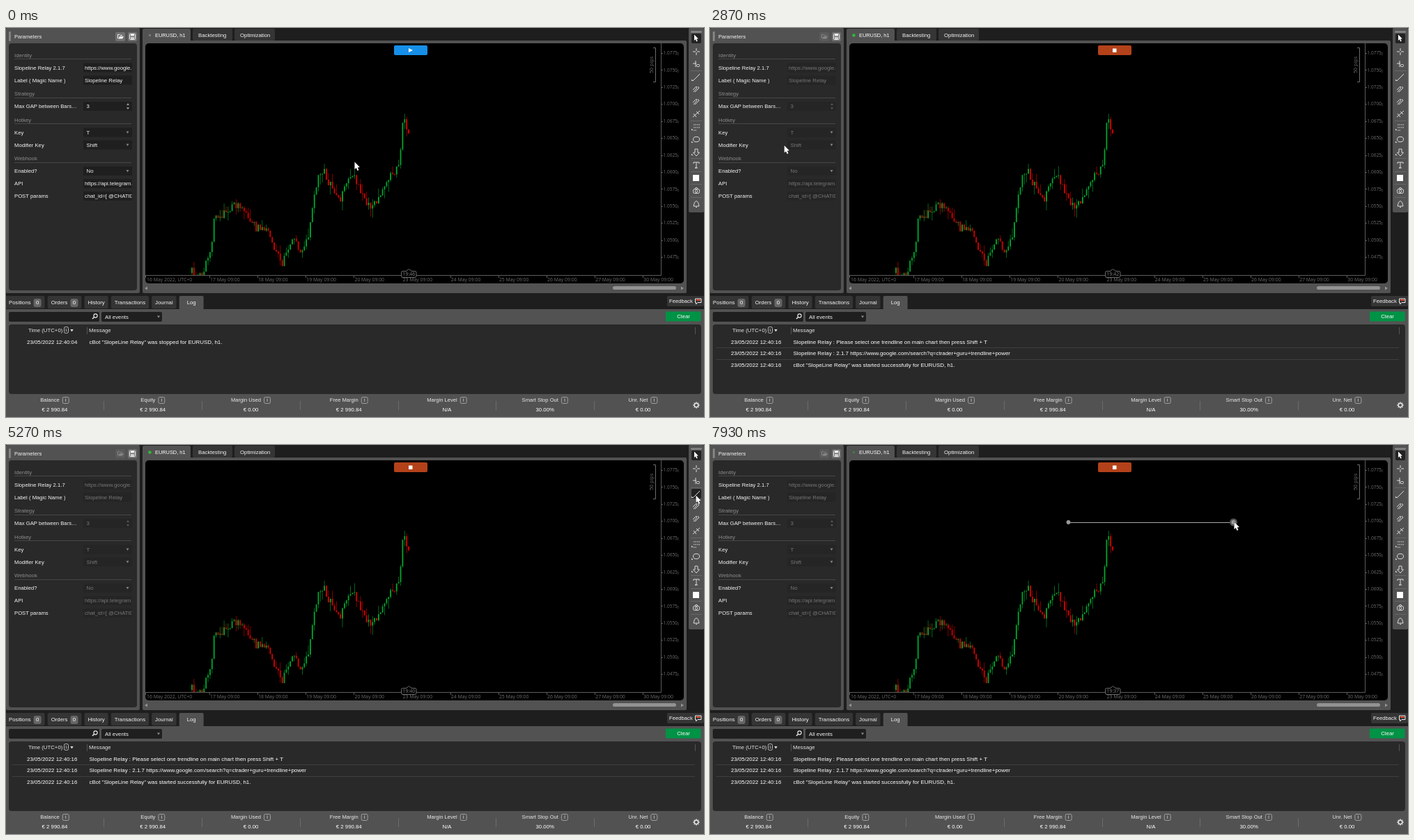
Write an HTML page with a canvas that moves like this. It is 1002 by 559 pixels and loops after 8 s.

```html
<!DOCTYPE html>
<html lang="en">
<head>
<meta charset="utf-8">
<title>Trading terminal</title>
<style>
html, body { margin: 0; width: 100%; height: 100%; overflow: hidden; background: #1e1e1e; }
canvas { display: block; }
</style>
</head>
<body>
<canvas id="stage" width="1002" height="559"></canvas>
<script>
const ctx = document.getElementById('stage').getContext('2d');
const LOOP = 8000, FPS = 15;
const UI = '"Liberation Sans", Arial, sans-serif';
const AXIS = '"Open Sans", "Noto Sans", sans-serif';
const FRAME = '#525252', PANEL = '#292929', FIELD = '#1f1f1f', BACK = '#1e1e1e', TAB = '#353535';
const WHITE = '#f4f4f4', ICON = '#dadada';

function box(x, y, w, h, color, r = 0) {
  ctx.fillStyle = color;
  ctx.beginPath();
  ctx.roundRect(x, y, w, h, r);
  ctx.fill();
}

function frameBox(x, y, w, h, color, r = 1) {
  ctx.beginPath();
  ctx.roundRect(x, y, w, h, r);
  ctx.strokeStyle = color;
  ctx.lineWidth = 1;
  ctx.stroke();
}

function text(s, x, y, color = WHITE, size = 7.8, align = 'left', font = UI) {
  ctx.font = `${size}px ${font}`;
  ctx.textAlign = align;
  ctx.textBaseline = 'middle';
  ctx.fillStyle = color;
  ctx.fillText(s, x, y + 0.5);
}

function widthOf(s, size = 7.8) {
  ctx.font = `${size}px ${UI}`;
  return ctx.measureText(s).width;
}

function trace(pts) {
  ctx.beginPath();
  for (const [x, y] of pts) ctx.lineTo(x, y);
}

function path(pts, color, width = 1, close = false) {
  trace(pts);
  if (close) ctx.closePath();
  ctx.strokeStyle = color;
  ctx.lineWidth = width;
  ctx.stroke();
}

function shape(pts, color) {
  trace(pts);
  ctx.fillStyle = color;
  ctx.fill();
}

function ring(x, y, rx, ry, color, width = 1) {
  ctx.beginPath();
  ctx.ellipse(x, y, rx, ry, 0, 0, 7);
  ctx.strokeStyle = color;
  ctx.lineWidth = width;
  ctx.stroke();
}

function disc(x, y, r, color) {
  ctx.beginPath();
  ctx.arc(x, y, r, 0, 7);
  ctx.fillStyle = color;
  ctx.fill();
}

// Isosceles arrowhead; a negative size points up
const arrow = (x, y, color, s = 2) => shape([[x - s, y - s * .7], [x + s, y - s * .7], [x, y + s * .9]], color);

// Values of a keyed track at position k
const linear = p => p, smooth = p => p * p * (3 - 2 * p);
function along(keys, k, ease = linear) {
  const i = keys.findIndex(key => key[0] > k);
  if (i < 0) return keys.at(-1).slice(1);
  const [k0, ...a] = keys[Math.max(0, i - 1)], [k1, ...b] = keys[i];
  const p = k1 > k0 ? ease((k - k0) / (k1 - k0)) : 0;
  return a.map((v, j) => v + (b[j] - v) * p);
}

const START = 1330, LOGGED = 1460, DRAWING = 6600;
const route = [
  [0, 500, 192], [330, 387, 205], [870, 576, 33], [1400, 576, 33], [2000, 438, 122],
  [2070, 282, 145], [2600, 101, 168], [3800, 142, 169], [4670, 960, 118], [4900, 990, 72],
  [5530, 990, 72], [6270, 528, 112], [DRAWING, 514, 110], [7330, 752, 110]
];
const countdown = [[0, 46], [700, 43], [5700, 39], [7250, 37]];

// Parameters
const groups = {
  Identity: [['Slopeline Relay 2.1.7', 'https://www.google.com'], ['Label ( Magic Name )', 'Slopeline Relay']],
  Strategy: [['Max GAP between Bars…', '3', 'spin']],
  Hotkey: [['Key', 'T', 'list'], ['Modifier Key', 'Shift', 'list']],
  Webhook: [['Enabled?', 'No', 'list'], ['API', 'https://api.telegram.org'], ['POST params', 'chat_id=[ @CHATID ]']]
};

function field([name, value, kind], y, locked) {
  text(name, 12, y, WHITE, 7.7);
  box(111, y - 6.5, 70, 13, locked ? '#252525' : FIELD, 1);
  ctx.save();
  ctx.beginPath();
  ctx.rect(112, y - 7, 68.5, 14);
  ctx.clip();
  text(value, kind ? 115.5 : 113, y, locked ? '#777' : WHITE);
  ctx.restore();
  if (kind === 'list') arrow(174.5, y, '#858585');
  if (kind === 'spin') for (const s of [-2, 2]) arrow(175, y + s * 1.5, locked ? '#555' : '#969696', s);
}

function parameters(locked) {
  box(0, 0, 192, 381, FRAME, 2);
  box(4, 5, 3, 14, '#838383', 1);
  text('Parameters', 12, 12, WHITE, 7.6);
  box(157, 6, 14, 13, locked ? '#5b5b5b' : '#717171', 2);
  box(175, 6, 13, 13, '#717171', 2);
  const ink = locked ? '#858585' : '#f0f0f0';
  path([[160.5, 15], [160.5, 9.5], [163, 9.5], [164, 10.5], [167, 10.5]], ink);
  shape([[161, 15.5], [163, 12], [169, 12], [167, 15.5]], ink);
  frameBox(177.5, 8.5, 8, 8, '#f0f0f0');
  box(179, 9, 5, 2.5, '#f0f0f0');
  box(179, 13, 5, 3, '#d0d0d0');
  box(4, 22, 184, 355, PANEL, 4);
  let y = 19.5;
  for (const [title, fields] of Object.entries(groups)) {
    y += 19.5;
    text(title, 12, y, '#8b8b8b');
    box(12, Math.round(y + 5), 168, 1, '#474747');
    for (const f of fields) field(f, y += 18, locked);
  }
}

// Price series
const prices = [
  [267, 350], [274, 362], [283, 352], [297, 305], [299, 262], [307, 270], [330, 254], [352, 277],
  [359, 288], [375, 286], [395, 341], [413, 305], [423, 318], [433, 303], [447, 216], [455, 203],
  [463, 222], [481, 245], [491, 217], [502, 216], [511, 241], [526, 260], [542, 228], [565, 195],
  [570, 128], [573, 132], [576, 151], [580, 152]
];

const candles = (() => {
  let seed = 41, open = 352;
  const rnd = () => (seed = seed * 16807 % 2147483647) / 2147483647;
  return Array.from({ length: 109 }, (_, i) => {
    const x = 267 + i * 2.88;
    const close = along(prices, x)[0] + (i > 102 ? 0 : (rnd() - .5) * 11);
    const top = Math.min(open, close) - rnd() ** 3 * 14;
    const low = Math.max(open, close) + rnd() ** 3 * 14;
    const candle = { x, open, close, top, low };
    open = close;
    return candle;
  });
})();

function drawCandles() {
  ctx.save();
  ctx.beginPath();
  ctx.rect(200, 22, 740, 333);
  ctx.clip();
  for (const { x, open, close, top, low } of candles) {
    const up = close < open;
    box(x - .4, top, .8, low - top, up ? '#008125' : '#a50000');
    box(x - .9, Math.min(open, close), 1.8, Math.max(1, Math.abs(open - close)), up ? '#00a52f' : '#d60000');
  }
  ctx.restore();
}

function drawAxes(t) {
  const line = '#5c5c5c', ink = '#6c6c6c';
  const label = (s, x, y, size = 6.9, align = 'left', color = ink) => text(s, x, y, color, size, align, AXIS);
  path([[200, 355.5], [940.5, 355.5], [940.5, 22]], line);
  for (let i = 0; i < 13; i++) {
    const y = 36 + i * 24.42;
    box(940, Math.round(y), 3, 1, line);
    label((1.0775 - i * .0025).toFixed(4), 943.5, y, 6.5);
    label('0', 963.3, y + 1.5, 4.6);
  }
  box(200, 355, 1, 4, line);
  label('16 May 2022, UTC+0', 202, 361.5);
  let day = 17;
  for (let i = 0; i < 10; i++) {
    const x = 292 + i * 69.15;
    box(Math.round(x), 355, 1, 4, line);
    label(`${day} May 09:00`, x + 1, 361.5);
    day += day % 7 === 6 ? 3 : 1; // skip weekends
  }
  path([[929, 28.5], [932.5, 28.5], [932.5, 77.5], [929, 77.5]], '#6c6c6c');
  ctx.save();
  ctx.translate(927, 53);
  ctx.rotate(-Math.PI / 2);
  label('50 pips', 0, 0, 7.2, 'center');
  ctx.restore();

  box(568, 349, 21, 9, '#000', 2);
  frameBox(567.5, 349.5, 21.5, 9, '#6c6c6c', 2);
  shape([[574.5, 350], [578.5, 346], [582.5, 350]], '#000');
  path([[574.5, 349.5], [578.5, 346.5], [582.5, 349.5]], '#6c6c6c');
  label('19:' + Math.ceil(along(countdown, t)[0]), 578.3, 353.5, 6.9, 'center', '#848484');
}

function runButton(active, hover) {
  const color = active ? (hover ? '#c54d20' : '#b3421a') : hover ? '#1499f8' : '#168fe8';
  box(557, 25, 48, 14, color, 2);
  if (active) box(578, 29.5, 5.5, 5.5, '#fff');
  else shape([[578, 29], [584, 32], [578, 35]], '#fff');
}

function pulse(t, active) {
  if (!active) return disc(206.5, 10.5, 1.4, '#858585');
  const p = t % 800;
  if (p > 630 && p < 705) return ring(206.5, 10.5, 2, 2, '#258b35');
  const glow = Math.max(.4, 1 - Math.abs(p - 470) / 260);
  disc(206.5, 10.5, 1.4 + glow * .8, `rgba(43,190,55,${glow})`);
}

function chart(t, active, hover) {
  box(196, 1, 69, 22, FRAME, 2);
  box(268, 1, 57, 17, TAB, 2);
  box(328, 1, 58, 17, TAB, 2);
  text('EURUSD, h1', 214, 10.5, '#fff', 7.4);
  text('Backtesting', 276, 10.5);
  text('Optimization', 336, 10.5);
  pulse(t, active);
  box(196, 18, 781, 363, FRAME, 2);
  box(200, 22, 773, 345, '#000', 5);
  for (const [x, d] of [[199, 4], [973, -4]]) shape([[x, 374], [x + d, 371.5], [x + d, 376.5]], '#949494');
  box(871, 371, 91, 5, '#929292', 2.5);
  drawCandles();
  drawAxes(t);
  runButton(active, hover);
}

function trendline(x) {
  const end = Math.max(514.5, x - .5);
  path([[514.5, 111.5], [end, 111.5]], '#a8a8a8');
  disc(514.5, 111, 2.9, '#999');
  if (end > 518) {
    disc(end, 111, 5.5, '#555');
    disc(end, 111, 3, '#a0a0a0');
  }
}

function tools(mx, my) {
  const c = ICON, X = 991;
  const cross = (y, a, b) => {
    for (const s of [-1, 1]) {
      path([[X + s * a, y], [X + s * b, y]], c);
      path([[X, y + s * a], [X, y + s * b]], c);
    }
  };
  box(980, 0, 22, 265, FRAME, 2);
  box(983, 4, 16, 3, '#808080', 1);
  for (let i = 0; i < 14; i++) {
    const y = 15 + i * 18.3;
    if (!i || (mx > 981 && Math.abs(my - y) < 8)) box(984, y - 7, 14, 14, '#222', 2);
  }
  for (const y of [61, 133, 187, 206, 224, 243]) box(983, y, 16, 1, '#686868');
  arrowhead(988, 9.5, .8);
  cross(34, 1, 5);
  path([[986, 51], [X, 51]], c);
  path([[990, 47], [990, 56]], c);
  frameBox(991.5, 52.5, 4, 3, c);
  path([[986, 76], [996, 66]], c);
  for (const y of [88, 106]) {
    path([[986, y + 1], [991, y - 4], [992, y - 2], [987, y + 4]], c);
    path([[989, y + 4], [995, y - 2], [993, y - 4]], c);
  }
  path([[986, 128], [996, 119]], c);
  path([[987, 123], [991, 128]], c);
  path([[991, 120], [995, 124]], c);
  ctx.setLineDash([1.5, 1]);
  for (const y of [139, 143, 147]) path([[987, y], [y > 143 ? 992 : 996, y]], c);
  ctx.setLineDash([]);
  ring(X, 160, 4.5, 3.7, c);
  path([[989, 174], [993, 174], [993, 179], [995.5, 179], [X, 184], [986.5, 179], [989, 179]], c, 1, true);
  for (const y of [76, 147, 165, 183]) shape([[984, y], [986.5, y], [984, y - 2.5]], c);
  path([[987, 195], [987, 193], [995, 193], [995, 195]], c);
  path([[X, 193], [X, 201], [989, 201], [993, 201]], c);
  box(986, 211, 9, 9, '#fff');
  frameBox(986.5, 231.5, 9, 6, c, 2);
  ring(X, 234.5, 1.8, 1.8, c);
  path([[989, 231], [990, 229.5], [992, 229.5], [993, 231]], c);
  path([[987, 256], [988.5, 250.5], [X, 248.5], [993.5, 250.5], [995, 256]], c, 1, true);
  box(990, 257, 2, 1, c);
}

// Log
const tabs = ['Positions', 'Orders', 'History', 'Transactions', 'Journal', 'Log'];
const stopped = ['cBot "SlopeLine Relay" was stopped for EURUSD, h1.'];
const started = [
  'Slopeline Relay : Please select one trendline on main chart then press Shift + T',
  'Slopeline Relay : 2.1.7 https://www.google.com/search?q=ctrader+guru+trendline+power',
  'cBot "SlopeLine Relay" was started successfully for EURUSD, h1.'
];
const sums = {
  'Balance': '€ 2 990.84', 'Equity': '€ 2 990.84', 'Margin Used': '€ 0.00', 'Free Margin': '€ 2 990.84',
  'Margin Level': 'N/A', 'Smart Stop Out': '30.00%', 'Unr. Net': '€ 0.00'
};

function logTabs() {
  let x = -1;
  tabs.forEach((name, i) => {
    const pad = i === 5 ? 11 : 5, w = widthOf(name), badge = i < 2 ? 15 : 0;
    const full = w + pad * 2 + badge;
    box(x, 385, full, i === 5 ? 20 : 18, i === 5 ? FRAME : TAB, 2);
    text(name, x + pad, 394);
    if (badge) {
      box(x + pad + w + 4, 389, 11, 12, '#666', 3);
      text('0', x + pad + w + 9.5, 394.8, '#fff', 7.8, 'center');
    }
    x += full + 4;
  });
  box(949, 385, 53, 15, TAB, 2);
  text('Feedback', 952, 392.5, WHITE, 7.7);
  box(991, 390, 6, 2, '#d8402c');
  path([[989.5, 389], [998, 389], [998, 394.5], [993, 394.5], [990.5, 397], [990.5, 394.5], [989.5, 394.5]], '#f0f0f0', 1, true);
}

function summary() {
  Object.entries(sums).forEach(([name, value], i) => {
    const c = 70 + i * 140.75, w = widthOf(name, 7.6), x = c - (w + 14) / 2;
    text(name, x, 534.5, '#e8e8e8', 7.6);
    frameBox(x + w + 4.5, 530.5, 9, 9, '#a0a0a0', 2);
    text('i', x + w + 9, 534.7, '#eee', 7, 'center');
    text(value, c, 548.8, '#fff', 7.8, 'center');
    if (i) box(Math.round(c - 70.4), 536, 1, 13, '#6c6c6c');
  });
  ring(991, 542, 2.8, 2.8, '#e0e0e0', 1.5);
  for (let a = 0; a < 8; a++) {
    const dx = Math.cos(a * Math.PI / 4), dy = Math.sin(a * Math.PI / 4);
    path([[991 + dx * 3, 542 + dy * 3], [991 + dx * 4.7, 542 + dy * 4.7]], '#e0e0e0', 1.3);
  }
}

function log(time, messages) {
  box(0, 404, 1002, 155, FRAME);
  logTabs();
  box(4, 408, 130, 14, FIELD, 2);
  ring(128.5, 413.5, 2.6, 2.6, '#eee', 1.1);
  path([[126.5, 415.5], [124, 418]], '#eee', 1.4);
  box(137, 408, 87, 14, FIELD, 2);
  text('All events', 142, 415);
  arrow(219, 415, '#8c8c8c');
  box(947, 407.5, 50.5, 14, '#009245', 1);
  text('Clear', 972.5, 414.5, '#fff', 7.8, 'center');

  box(4, 426, 994, 100, PANEL, 4);
  text('Time (UTC+0)', 32, 434.5, '#e4e4e4');
  frameBox(83.5, 429.5, 6, 9, '#b8b8b8', 2);
  text('1', 86.5, 434.3, '#ddd', 6, 'center');
  arrow(94.5, 434.5, '#ddd', 2.2);
  text('Message', 119, 434.5, '#e4e4e4');
  for (const x of [116, 989]) box(x, 430, 1, 10, '#555');
  messages.forEach((message, i) => {
    const y = 451 + i * 16.6;
    text('23/05/2022 ' + time, 30, y, '#fff', 7.9);
    text(message, 119.5, y, '#fff', 7.95);
    if (i) box(9, Math.round(y - 8.6), 980, 1, '#3f3f3f');
  });
  summary();
}

function arrowhead(x, y, scale = 1, outline) {
  const pts = [[0, 0], [0, 10.6], [2.4, 8.5], [4, 12.4], [5.9, 11.6], [4.2, 7.9], [7.3, 7.6]]
    .map(([dx, dy]) => [x + dx * scale, y + dy * scale]);
  if (outline) path(pts, outline, 1, true);
  shape(pts, '#fff');
}

function draw(now) {
  const step = Math.floor((now % LOOP) * FPS / 1000 + .06);
  const t = step * 1000 / FPS % LOOP;
  const [mx, my] = along(route, t, smooth);
  const active = t >= START;
  const hover = mx > 557 && mx < 605 && my > 25 && my < 39;
  box(0, 0, 1002, 559, BACK);
  parameters(active);
  chart(t, active, hover);
  if (t >= DRAWING) trendline(mx);
  tools(mx, my);
  if (t < LOGGED) log('12:40:04', stopped);
  else log('12:40:16', started);
  arrowhead(mx + .5, my + .5, 1, '#111');
}

let origin;
function tick(now) {
  origin ??= now;
  draw(now - origin);
  requestAnimationFrame(tick);
}
requestAnimationFrame(tick);
</script>
</body>
</html>
```
